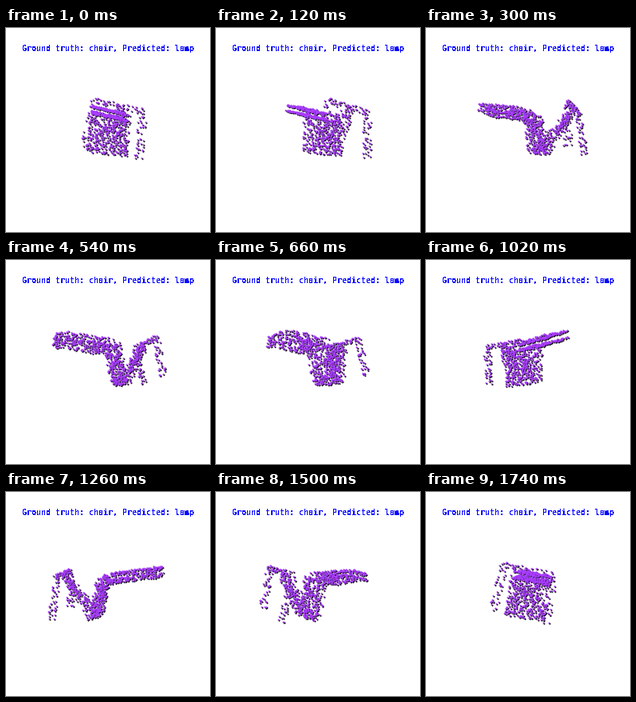
Write a matplotlib script that moves like this. It is 256 px wide and 256 px high and loops after 1.8 s.

```python
import numpy as np
import matplotlib.pyplot as plt
from matplotlib.animation import FuncAnimation

SIZE, DPI = 256, 64
FRAMES, STEP_MS = 30, 60
EYE = 380  # camera distance, in pixels
PURPLE = "#a93cff"

rng = np.random.default_rng(11)

# Chair corners (left, right): x right, y down, z towards the viewer
tip = np.array([[-24, -32, -67], [22, -22, -69]])
joint = np.array([[-21, -24, 6], [28, -13, 6]])
front = np.array([[-28, 25, 17], [23, 33, 14]])
apex = np.array([[-14, -31, 59], [38, -20, 53]])
foot = np.array([[-25, 19, 64], [31, 34, 63]])


def sheet(a, b, n, thick, corner=0.0):
    """Points on both faces of a slab from edge a to edge b, end b rounded."""
    u, v = rng.random((2, n, 1))
    u = 0.5 + (u - 0.5) * np.sqrt(1 - corner * np.clip(v * 6 - 5, 0, 1) ** 2)
    left = a[0] + (b[0] - a[0]) * v
    right = a[1] + (b[1] - a[1]) * v
    normal = np.cross(a[1] - a[0], b[0] - a[0])
    normal = normal / np.linalg.norm(normal)
    side = rng.choice([-1, 1], (n, 1)) * thick / 2
    side += rng.uniform(-0.7, 0.7, (n, 1))
    return left + (right - left) * u + normal * side


def tube(a, b, n, radius):
    """Points on the skin of a straight tube."""
    skin = rng.normal(size=(n, 3))
    skin *= radius / np.linalg.norm(skin, axis=1, keepdims=True)
    return a + (b - a) * rng.random((n, 1)) + skin


# The brace narrows from the seat front to the middle of the top bar
brace = apex.mean(axis=0) + (apex - apex.mean(axis=0)) * 0.25

cloud = np.vstack([
    sheet(joint, tip, 360, 7.5, 0.6),
    sheet(joint, front, 270, 4),
    sheet(front, brace, 190, 4),
    tube(apex[0], apex[1], 50, 3.5),
    tube(apex[0], foot[0], 40, 4.5),
    tube(apex[1], foot[1], 40, 4.5),
])


def project(angle):
    x, y, z = cloud.T
    c, s = np.cos(angle), np.sin(angle)
    scale = EYE / (EYE - (z * c - x * s))
    return np.column_stack([(x * c + z * s) * scale, y * scale]) + (127.5, 127.5)


fig = plt.figure(figsize=(SIZE / DPI, SIZE / DPI), dpi=DPI, facecolor="white")
ax = fig.add_axes([0, 0, 1, 1])
ax.set(xlim=(0, SIZE), ylim=(SIZE, 0))
ax.axis("off")

px = 72 / DPI
ax.text(127.5, 29, "Ground truth: chair, Predicted: lamp", color="#0000ff",
        family="DejaVu Sans Mono", weight="bold", size=10 * px,
        ha="center", va="baseline", antialiased=False)


def dots(color):
    return ax.scatter(*project(0).T, s=(2 * px) ** 2, c=color,
                      linewidths=0, antialiased=False)


rim, fill = dots("black"), dots(PURPLE)


def update(i):
    points = project(2 * np.pi * i / FRAMES)
    rim.set_offsets(points + 1)
    fill.set_offsets(points)
    return rim, fill


anim = FuncAnimation(fig, update, frames=FRAMES, interval=STEP_MS,
                     repeat=True, repeat_delay=0)
plt.show()
```
